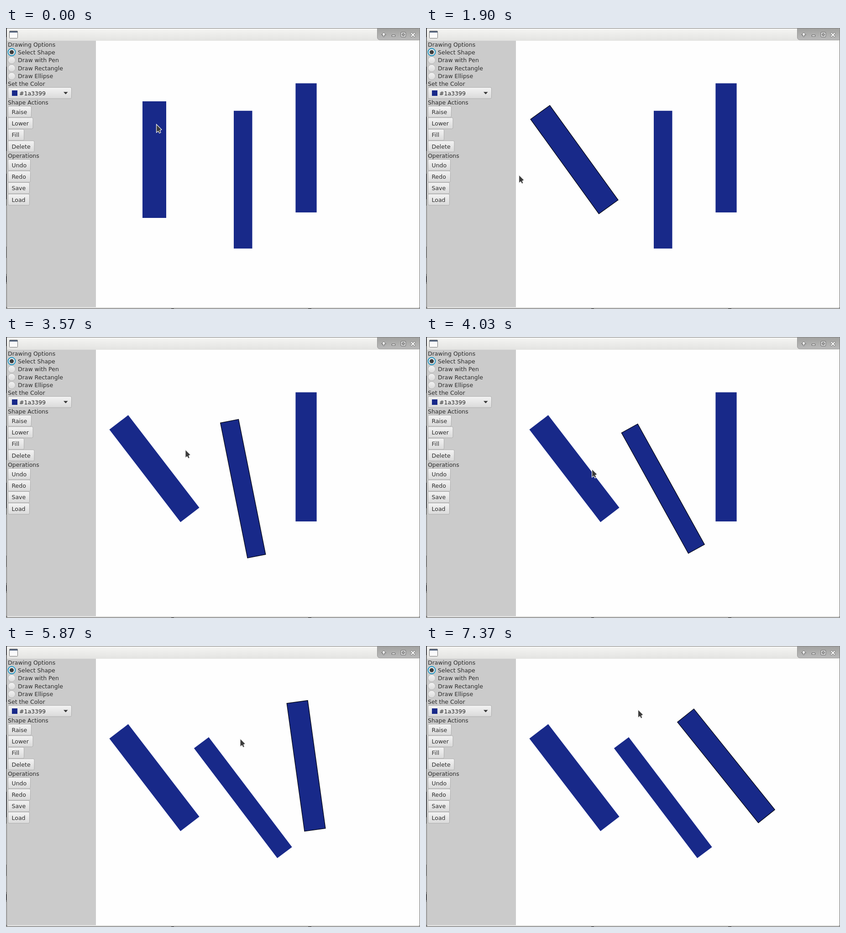
Write an HTML page that moves like this. It is 907x617 px and loops after 7.41 s.

```html
<!DOCTYPE html>
<html lang="en">
<head>
<meta charset="utf-8">
<title>Rotating shapes</title>
<style>
html, body { margin: 0; width: 100%; height: 100%; overflow: hidden; background: #fefefe; }
svg { display: block; }
text { font: 12.5px "DejaVu Sans", sans-serif; fill: #2c2c2c; }
.button { fill: url(#face); stroke: #adadad; }
.bar { fill: #182989; }
.selected { stroke: #080b1c; stroke-width: 1.4; }
</style>
</head>
<body>
<svg width="907" height="617" viewBox="0 0 907 617">
  <defs>
    <linearGradient id="title" x2="0" y2="1"><stop stop-color="#f5f5f3"/><stop offset="1" stop-color="#e3e3e1"/></linearGradient>
    <linearGradient id="corner" x2="0" y2="1"><stop stop-color="#a2a2a0"/><stop offset="1" stop-color="#bababa"/></linearGradient>
    <linearGradient id="face" x2="0" y2="1"><stop stop-color="#f3f3f3"/><stop offset="1" stop-color="#dadada"/></linearGradient>
  </defs>
  <rect width="907" height="617" fill="#777"/>
  <path d="M.5 0V20M.5 85V123M.5 195V270M.5 320V376M.5 545V558" stroke="#1c1c24"/>
  <path d="M.5 390V480M.5 505V540M.5 562V612" stroke="#c4c4c4"/>
  <rect x="1.5" y=".5" width="905" height="615" rx="3" fill="#f0f0ee" stroke="#777"/>
  <rect x="2" y="1" width="904" height="27" rx="2" fill="url(#title)"/>
  <rect x="2" y="28" width="195" height="585" fill="#cbcbcb"/>
  <rect x="197" y="28" width="708" height="585" fill="#fefefe"/>
  <path d="M0 616.5H907" stroke="#bbb"/>
  <path d="M362 616.5h6M662 616.5h7" stroke="#444"/>
  <path d="M813.5 1V20Q813.5 26 819.5 26H906V1Z" fill="url(#corner)" stroke="#969696"/>
  <rect x="7.5" y="6.5" width="18" height="16" rx="1" fill="#fafafa" stroke="#777"/>
  <path d="M8 8.5H25" stroke="#52627c" stroke-width="3"/>
  <g fill="#fff" stroke="#555" stroke-width=".9">
    <path d="M827.5 10L832.5 15H829V19H826V15H822.5Z"/>
    <rect x="845.5" y="15.5" width="7" height="3"/>
    <path fill-rule="evenodd" d="M865.5 9.5H875.5V19.5H865.5ZM868 12V17H873V12Z"/>
    <rect x="869" y="13" width="3" height="3"/>
    <path d="M888 9.5L891.5 13 895 9.5 897 11.5 893.5 15 897 18.5 895 20.5 891.5 17 888 20.5 886 18.5 889.5 15 886 11.5Z"/>
  </g>
  <g id="panel"></g>
  <g id="bars"></g>
  <path id="cursor" d="M.5 .5V18.5L4.5 15.5 7 20 10 18.5 8 14 12 12Z" fill="#3b3b3b" stroke="#f2f2f2" stroke-width="1.2"/>
</svg>
<script>
const LOOP = 7410, STEP = 100 / 3;
const byId = id => document.getElementById(id);

function add(parent, tag, attrs, content = "") {
  const node = document.createElementNS("http://www.w3.org/2000/svg", tag);
  for (const name in attrs) node.setAttribute(name, attrs[name]);
  node.textContent = content;
  parent.append(node);
  return node;
}

const panel = byId("panel");
const label = (x, y, content) => add(panel, "text", { x, y }, content);
const button = (y, width, content) => {
  add(panel, "rect", { class: "button", x: 4.5, y: y - 12.5, width, height: 24.5, rx: 2.5 });
  label(12.5, y + 4.5, content);
};

label(4, 41, "Drawing Options");
["Select Shape", "Draw with Pen", "Draw Rectangle", "Draw Ellipse"].forEach((name, i) => {
  const cx = 12.5, cy = 53 + i * 17.6;
  add(panel, "circle", { cx, cy, r: 8, fill: "url(#face)", stroke: i ? "#b4b4b4" : "#1593c4", "stroke-width": i ? 1 : 1.8 });
  if (!i) add(panel, "circle", { cx, cy, r: 4.6, fill: "#3d3d3d" });
  label(26, cy + 4.5, name);
});
label(4, 127, "Set the Color");
button(143, 139, "");
add(panel, "rect", { class: "bar", x: 13, y: 137, width: 12, height: 12 });
label(29, 147.5, "#1a3399");
add(panel, "path", { d: "M126 140.5H135.5L130.75 145.5Z", fill: "#333" });
label(4, 168, "Shape Actions");
[["Raise", 51], ["Lower", 54.5], ["Fill", 35], ["Delete", 57.5]]
  .forEach(([name, width], i) => button(184 + i * 25.4, width, name));
label(4, 285, "Operations");
[["Undo", 49], ["Redo", 49], ["Save", 47], ["Load", 47]]
  .forEach(([name, width], i) => button(301 + i * 25.4, width, name));

// Each bar: centre, size, selected interval and [time, degrees] keys.
const bars = [
  { cx: 325, cy: 289, w: 52, h: 256, from: 200, to: 2660, turn: [[570, 0], [1300, -18.1], [1960, -37.5]] },
  { cx: 519.25, cy: 333, w: 40.5, h: 302.5, from: 2660, to: 5000, turn: [[2900, 0], [3570, -11.35], [4250, -37.1]] },
  { cx: 657.5, cy: 263.2, w: 46.2, h: 283.5, from: 5000, to: LOOP, turn: [[5300, 0], [5870, -7.9], [5900, -9.6], [6560, -38.7]] },
];
for (const bar of bars) {
  const { cx, cy, w, h } = bar;
  bar.node = add(byId("bars"), "rect", { x: cx - w / 2, y: cy - h / 2, width: w, height: h });
}

const path = [
  [570, 329, 211], [900, 283, 221], [1300, 226, 260], [1900, 203, 322], [2050, 215, 318],
  [2600, 522, 203], [2880, 522, 203], [3200, 459, 213], [3570, 392, 247], [4180, 354, 303],
  [4290, 370, 290], [4630, 635, 151], [4780, 652, 148], [5230, 652, 148], [5550, 580, 167],
  [5870, 512, 203], [6500, 464, 258], [6700, 461, 240], [7300, 464, 139],
];

function sample(keys, t, column) {
  const i = keys.findIndex(key => key[0] > t);
  if (i === 0) return keys[0][column];
  if (i < 0) return keys[keys.length - 1][column];
  const a = keys[i - 1], b = keys[i];
  return a[column] + (b[column] - a[column]) * (t - a[0]) / (b[0] - a[0]);
}

function draw(now) {
  const t = Math.floor((now % LOOP + 4) / STEP) * STEP + 1;
  for (const { node, cx, cy, from, to, turn } of bars) {
    node.setAttribute("transform", `rotate(${sample(turn, t, 1)} ${cx} ${cy})`);
    node.setAttribute("class", t >= from && t < to ? "bar selected" : "bar");
  }
  byId("cursor").setAttribute("transform", `translate(${sample(path, t, 1)} ${sample(path, t, 2)})`);
}

const start = performance.now();
function tick() {
  draw(performance.now() - start);
  requestAnimationFrame(tick);
}
tick();
</script>
</body>
</html>
```
